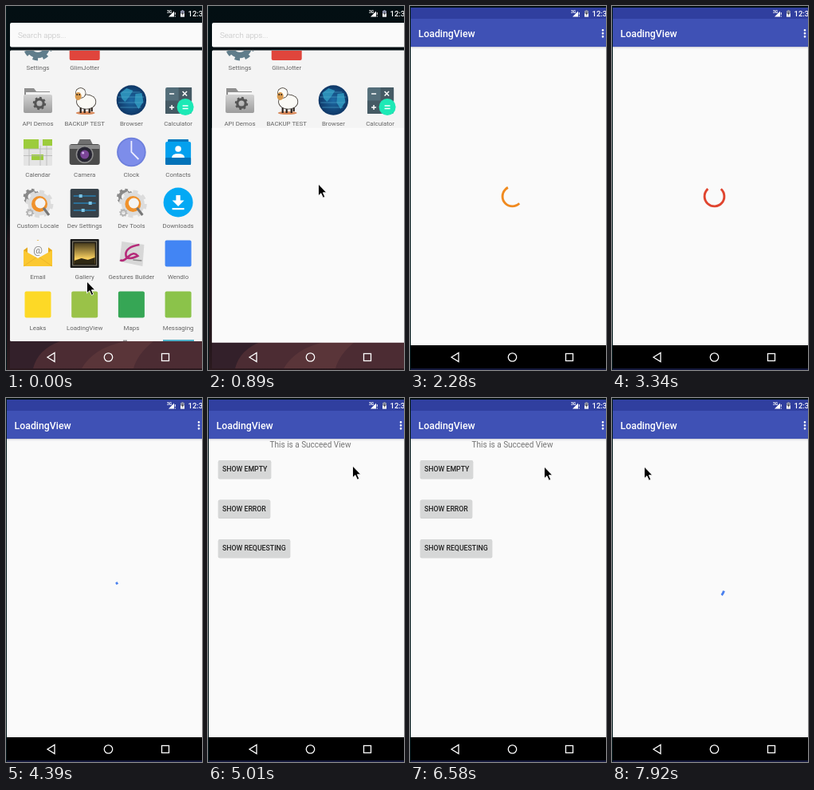
Write an HTML page that moves like this. It is 246 px wide and 456 px high and loops after 8 s.

```html
<!DOCTYPE html>
<html lang="en">
<head>
<meta charset="utf-8">
<title>Loading view demo</title>
<style>
html, body { margin: 0; width: 100%; height: 100%; overflow: hidden; background: #030f13; }
svg { display: block; width: 100%; height: 100%; }
text { font-family: Roboto, sans-serif; }
.label { font-size: 7.9px; fill: #666; text-anchor: middle; }
.button { font-size: 8.75px; font-weight: 500; fill: #202020; }
.line { fill: none; stroke: #fff; stroke-width: 1.3; }
</style>
</head>
<body>
<svg viewBox="0 0 246 456">
  <defs>
    <linearGradient id="wallpaper" x2="0" y2="1">
      <stop offset="0" stop-color="#030f13"/><stop offset=".57" stop-color="#050d11"/>
      <stop offset=".64" stop-color="#1d1218"/><stop offset=".9" stop-color="#22151a"/><stop offset="1" stop-color="#2c1a1f"/>
    </linearGradient>
    <linearGradient id="metal" x2="0" y2="1">
      <stop offset="0" stop-color="#d2d2d2"/><stop offset="1" stop-color="#9c9c9c"/>
    </linearGradient>
    <linearGradient id="sunset" x2="0" y2="1">
      <stop offset="0" stop-color="#4a3d1e"/><stop offset=".75" stop-color="#f8d060"/><stop offset="1" stop-color="#d9a63c"/>
    </linearGradient>
    <radialGradient id="globe">
      <stop offset="0" stop-color="#1d6ba6"/><stop offset="1" stop-color="#0f3766"/>
    </radialGradient>
    <clipPath id="panel"><rect x="5" y="56" width="241" height="364"/></clipPath>
    <clipPath id="reveal"><rect id="revealBox"/></clipPath>
    <g id="status">
      <text x="202" y="9" font-size="5" font-weight="700" fill="#fff">3G</text>
      <path d="M204 13.5L211 6.5V13.5Z" fill="#fff"/>
      <path d="M212.3 8V11M212.3 12.3V13.5" stroke="#fff"/>
      <path d="M219 6H220.5V5H222.5V6H224V13.5H219Z" fill="#8b90a8"/>
      <path d="M219 9.5H224V13.5H219Z" fill="#fff"/>
      <path d="M222 7L220.3 10H221.5L221 12.5 223 9.2H221.7Z" fill="#333"/>
      <text x="228.5" y="12.8" font-size="9.5" font-weight="500" fill="#fff">12:30</text>
    </g>
    <g id="nav" class="line">
      <path d="M52 440L61 434.5V445.5Z"/>
      <circle cx="128.5" cy="440" r="5.2"/>
      <rect x="195.5" y="435.5" width="9" height="9"/>
    </g>
  </defs>

  <rect width="246" height="456" fill="url(#wallpaper)"/>
  <g id="drawer">
    <rect x="5" y="420" width="241" height="34" fill="#4c2c33"/>
    <path d="M5 420H68Q40 430 34 454H5Z" fill="#33202a"/>
    <path d="M95 454Q110 428 150 420H185Q165 436 160 454Z" fill="#5a3539"/>
    <rect x="5" y="21" width="245" height="30.5" rx="2" fill="#fafafa"/>
    <text x="15" y="40.2" font-size="9.8" font-weight="300" fill="#bdbdbd">Search apps...</text>
    <rect x="5" y="55.5" width="245" height="364.5" rx="1.5" fill="#f4f4f4"/>
    <g id="apps" clip-path="url(#panel)"></g>
    <use href="#status"/><use href="#nav"/>
  </g>

  <g clip-path="url(#reveal)">
    <rect x="1" y="2" width="245" height="454" fill="#fafafa"/>
    <rect x="1" y="51" width="245" height="1" fill="#cfd0d8"/>
    <rect x="1" y="52" width="245" height="1.5" fill="#ededf0"/>
    <rect x="1" y="2" width="245" height="14" fill="#303f9f"/>
    <rect x="1" y="16" width="245" height="35" fill="#3f51b5"/>
    <text x="10.6" y="38.8" font-size="12.3" font-weight="500" fill="#fff">LoadingView</text>
    <path d="M242 30.3h.01M242 34.3h.01M242 38.3h.01" stroke="#fff" stroke-width="2.7" stroke-linecap="round"/>
    <rect x="1" y="425" width="245" height="31"/>
    <rect x="1" y="454" width="245" height="2" fill="#14183c"/>
    <use href="#status"/><use href="#nav"/>
    <g id="content">
      <text x="128.5" y="62" font-size="10" fill="#757575" text-anchor="middle">This is a Succeed View</text>
    </g>
    <circle id="spinner" cx="128.5" cy="238.5" r="12.4" fill="none" stroke-width="2.9" pathLength="360"/>
  </g>
  <rect width="1" height="456" fill="#02181b"/>
  <path id="cursor" d="M0 0V14.8L3.4 11.7 5.9 17.3 8.3 16.2 5.9 10.8H10.4Z" stroke="#fff" stroke-width=".9"/>
</svg>
<script>
const $ = id => document.getElementById(id);
const rect = (x, y, w, h, fill, rx = 0) =>
  `<rect x="${x}" y="${y}" width="${w}" height="${h}" rx="${rx}" fill="${fill}"/>`;
const ellipse = (x, y, rx, ry, fill) => `<ellipse cx="${x}" cy="${y}" rx="${rx}" ry="${ry}" fill="${fill}"/>`;
const circle = (x, y, r, fill) => ellipse(x, y, r, r, fill);
const path = (d, fill) => `<path d="${d}" fill="${fill}"/>`;
const stroke = (d, color, width = 1.5) => `<path d="${d}" fill="none" stroke="${color}" stroke-width="${width}"/>`;
const tile = color => rect(-16.5, -16.5, 33, 33, color, 2);
// Ring with eight teeth
const gear = (x, y, r, color) => {
  const ring = (radius, width, dash) => `<circle cx="${x}" cy="${y}" r="${radius}" fill="none" stroke="${color}"
    stroke-width="${width}" pathLength="16" ${dash}/>`;
  return ring(r * .65, r * .4, '') + ring(r * .9, r * .25, 'stroke-dasharray="1"');
};
const cogs = gear(-8, -8, 10, '#8a8a8a') + gear(2, 1, 17, '#dcdcdc') + circle(2, 1, 10, '#f0922c') +
  circle(3, 0, 6.5, '#f4f4f4') + stroke('M7 6L14 15', '#777', 3) + gear(-10, 12, 5, '#b5b5b5');

// Icons are drawn around their own centre.
const apps = [
  ['Settings', gear(0, 2, 18, '#607d8b') + circle(0, 2, 6, '#b0bec5')],
  ['GlimJotter', rect(-19, -18, 38, 38, '#e0453c', 2)],
  null, null,
  ['API Demos', path('M-17 -15H-5L-2 -11H15V-4H-17Z', '#8f8f8f') + rect(-15, -10, 30, 8, '#f2f2f2') +
    rect(-18, -7, 36, 23, 'url(#metal)', 2) + gear(2, 4, 8, '#555')],
  ['BACKUP TEST', ellipse(1, 16, 12, 2, '#d98a5c') + stroke('M-5 7V16M0 9V16M6 8V16M9 5V14', '#2b221c', 2.2) +
    ellipse(2, 2, 12.5, 9.5, '#3a332c') + ellipse(2, 2, 11.7, 8.7, '#fbfaf5') +
    circle(-5, -9, 6.7, '#3a332c') + circle(-5, -9, 6, '#fbfaf5') +
    ellipse(-8, -5, 4, 5, '#d99a4e') + circle(-9.5, -7, .9, '#222') + circle(-6.5, -7, .9, '#222')],
  ['Browser', circle(0, 0, 18.7, 'url(#globe)') +
    path('M-14 -9L-6 -15 2 -12 -3 -4 -8 2 -12 -2ZM5 -8L13 -9 15 2 9 11 4 3Z', '#2c8fb8') +
    stroke('M-17 -4H16M-16 3H15M-14 9H12M-12 -10H11', '#4fa9cf', .6)],
  ['Calculator', rect(-16, -16, 33, 33, '#546e7a', 2) + rect(.5, -16, 16.5, 16.5, '#455a64') +
    rect(-16, .5, 16.5, 16.5, '#455a64') +
    stroke('M-11 -8H-5M5.5 -11L11 -5.5M11 -11L5.5 -5.5M-11 9H-5M-8 6V12', '#fff') +
    circle(9, 8.5, 10.5, '#1de9b6') + stroke('M5.5 7H12.5M5.5 10.5H12.5', '#fff')],
  ['Calendar', rect(-18, -16, 36, 33, '#e4e4e4', 1) + rect(-18, -16, 19, 12, '#9ccc3c') +
    rect(6, -16, 12, 8, '#9ccc3c') + rect(-8, 3, 15, 7, '#9ccc3c') +
    stroke('M-18 4.5H18M-11 -4V17M3 -8V17M11 -8V17M-18 -4H18', '#b5b5b5', .8)],
  ['Camera', rect(-19, -10, 38, 26, '#4b4b4b', 3) + path('M-9 -10L-6 -16H7L10 -10Z', '#707070') +
    rect(-19, -9, 38, 5, '#8b8b8b') + circle(0, 3, 11, '#8d8d8d') + circle(0, 3, 9.5, '#282633') +
    circle(0, 3, 5.5, '#7a4596') + circle(-2, 1, 1.5, '#d0b4eb')],
  ['Clock', circle(0, 0, 18.3, '#6d7fdc') + circle(0, 0, 16.5, '#7d8dea') + stroke('M0 -14V0L9 9', '#eef', 1.8)],
  ['Contacts', rect(-13, -16, 26, 6, '#0277bd', 1) + rect(-16, -13, 32, 29, '#03a0ee', 2) +
    rect(-16, 7, 32, 9, '#0272b8', 1) + circle(0, -4, 3.8, '#fff') + path('M-8 7Q-8 2 0 2T8 7Z', '#fff')],
  ['Custom Locale', cogs],
  ['Dev Settings', rect(-18, -18, 36, 36, '#37424a', 2) + stroke('M-14 -9H14M-14 0H14M-14 9H14', '#2a7fb0', 1.6) +
    rect(-7, -11, 4, 4, '#7cc4e4') + rect(5, -2, 4, 4, '#7cc4e4') + rect(-4, 7, 4, 4, '#7cc4e4')],
  ['Dev Tools', cogs],
  ['Downloads', circle(0, -1, 18.5, '#03a9f4') + path('M-2.7 -10H2.7V-3.5H7.5L0 4 -7.5 -3.5H-2.7Z', '#fff') +
    rect(-7.5, 6, 15, 2.2, '#fff')],
  ['Email', path('M-18 -4L0 -17 18 -4V16H-18Z', '#e5a91d') + rect(-13, -16, 26, 26, '#f6f6f6') +
    '<text y="0" font-size="13" fill="#888" text-anchor="middle">@</text>' +
    path('M-18 -4L0 6 18 -4V16H-18Z', '#fbc831') + stroke('M-18 16L-2 5M18 16L2 5', '#e8b02a', .8)],
  ['Gallery', rect(-18, -18, 36, 36, '#181818', 1) + rect(-15.5, -15.5, 31, 31, '#8f8a78') +
    rect(-14.5, -14.5, 29, 29, '#1c1810') + rect(-13, -13, 26, 26, 'url(#sunset)') +
    path('M-13 9L-4 6 4 8 13 5V13H-13Z', '#2f2814')],
  ['Gestures Builder', path('M-12 -15L16 -11 14 16 -15 10Z', '#d7d7d7') +
    stroke('M10 -11Q-7 -8 -7 1T8 3Q3 -3 -4 4T-14 8', '#b52a79', 2.6) + stroke('M2 8L13 9', '#888')],
  ['Wendlo', tile('#4285f4')],
  ['Leaks', tile('#fdd926')],
  ['LoadingView', tile('#9ac248')],
  ['Maps', tile('#36a655')],
  ['Messaging', tile('#8bc34a')],
];
const rowY = [48, 118, 183, 247, 310, 374], labelY = [80, 150, 214, 278, 342, 406];
apps.forEach((app, i) => {
  if (!app) return;
  const x = 40 + (i % 4) * 58.7, row = i >> 2;
  $('apps').innerHTML += `<g transform="translate(${x} ${rowY[row]})">${app[1]}</g>
    <text class="label" x="${x}" y="${labelY[row]}">${app[0]}</text>`;
});
$('apps').innerHTML += rect(197, 418, 39, 3, '#4fb0c8') + rect(147, 418.5, 5, 2, '#999');

[['SHOW EMPTY', 78, 66], ['SHOW ERROR', 127.5, 65], ['SHOW REQUESTING', 177, 90]].forEach(([label, y, width]) => {
  $('content').innerHTML += rect(12.7, y + .3, width + .6, 23.2, '#cdcece', 2) + rect(13, y, width, 23, '#d6d7d7', 2) +
    `<text class="button" x="18" y="${y + 14.4}">${label}</text>`;
});

const LOOP = 8000, STEP = 87.8, SPIN = 627;
const colors = ['#4a80ee', '#e0452f', '#f08a1f'];
// Pointer stops: step, x, y
const trips = [
  [[0, 101, 345], [2, 101, 368], [4, 101, 368], [10, 138, 223], [14, 150, 249], [18, 206, 190], [20, 206, 190]],
  [[55, 150, 101], [57, 181, 85], [61, 16, 90], [65, 101, 58], [67, 67, 55], [71, 199, 32], [74, 140, 86],
   [75, 168, 86], [76, 168, 86], [81, 28, 96], [83, 40, 86], [92, 40, 86]],
];

// Cubic bezier (.4, 0, .2, 1)
function ease(x) {
  let low = 0, high = 1, s;
  for (let i = 0; i < 16; i++) {
    s = (low + high) / 2;
    const bx = 1.2 * s * (1 - s) ** 2 + .6 * s * s * (1 - s) + s ** 3;
    if (bx < x) low = s; else high = s;
  }
  return s * s * (3 - 2 * s);
}
const clamp = v => Math.min(1, Math.max(0, v));
const show = (id, on) => $(id).setAttribute('visibility', on ? 'visible' : 'hidden');
const set = (id, attrs) => Object.entries(attrs).forEach(([key, value]) => $(id).setAttribute(key, value));

function moveCursor(step) {
  const trip = trips.find(stops => step >= stops[0][0] && step < stops.at(-1)[0]);
  show('cursor', trip);
  if (!trip) return;
  const i = trip.findIndex(stop => stop[0] > step);
  const [from, to] = [trip[i - 1], trip[i]];
  const p = (step - from[0]) / (to[0] - from[0]);
  const at = k => from[k] + (to[k] - from[k]) * p;
  set('cursor', { transform: `translate(${at(1) + .5} ${at(2)})` });
}

function revealApp(step) {
  const p = clamp((step - 6) / 6.75), left = 1 + 98 * (1 - p) ** 3.6;
  const top = 375 * (1 - p);
  set('revealBox', { x: left, y: top, width: p ? (99 - left) * 2 + 60 : 0, height: p ? 375 + 81 * p ** 1.05 - top : 0 });
}

function spin(time) {
  const cycle = Math.floor(time / SPIN), u = time / SPIN - cycle;
  const tail = 288 * ease(clamp(2 * u - 1)), head = 288 * ease(clamp(2 * u)) + 14;
  set('spinner', {
    stroke: colors[cycle % colors.length],
    'stroke-dasharray': `${head - tail} 360`,
    transform: `rotate(${cycle * 234 + u * 306 + tail - 5} 128.5 238.5)`,
  });
}

function draw(now) {
  const step = Math.floor((now % LOOP + 10) / STEP), time = step * STEP;
  const loaded = step >= 51 && step < 90;
  show('drawer', step < 13);
  show('content', loaded);
  show('spinner', step > 10 && !loaded);
  revealApp(step);
  spin(Math.max(0, time - (step < 90 ? 622 : 7861)));
  moveCursor(step);
}

const start = performance.now();
(function tick() {
  draw(performance.now() - start);
  requestAnimationFrame(tick);
})();
</script>
</body>
</html>
```
